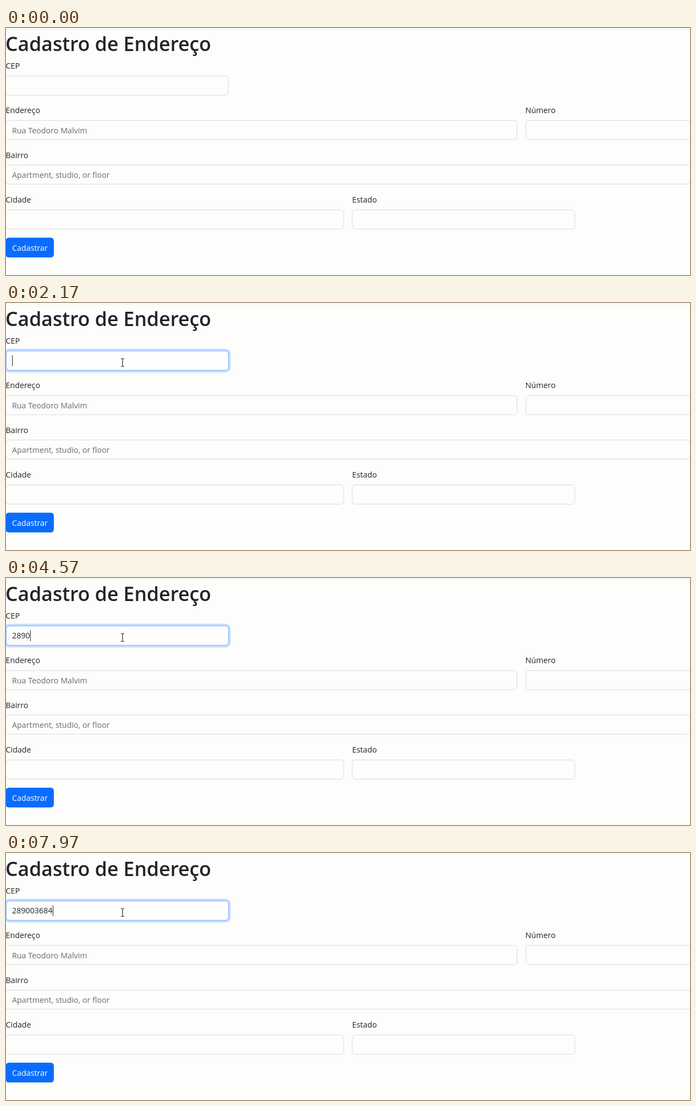
Recreate the animation shown at these times as an HTML page. Size 1244 by 450 pixels, loop 8 s.

```html
<!DOCTYPE html>
<html lang="pt-BR">
<head>
<meta charset="utf-8">
<title>Cadastro de Endereço</title>
<style>
  html, body { margin: 0; width: 100%; height: 100%; overflow: hidden; background: #fdfdfc; }
  body { position: relative; font: 14.3px "Open Sans", "Noto Sans", sans-serif; color: #212529; }
  svg { position: absolute; left: 0; top: 0; }
  text { fill: #212529; }
  .title { font-size: 35.55px; font-weight: 600; }
  .hint { fill: #686c70; }
  .on-button { fill: #fff; }
  .field rect { fill: none; stroke: #dadae6; rx: 5.5px; }

  .focus, .typed, .pointer, .arrow, .beam { animation: 8s step-end infinite; }

  .focus {
    position: absolute; left: 0; top: 87px; width: 405px; height: 36px;
    box-sizing: border-box; border: 1px solid #86b7fe; border-radius: 6px;
    background: #fefefe; box-shadow: 0 0 0 3.5px #c3dafe;
    animation-name: focus; animation-timing-function: ease-in-out;
  }
  /* The right border is the caret; the width uncovers whole digits. */
  .typed {
    position: absolute; left: 11px; top: 95px; height: 20px; line-height: 20px;
    overflow: hidden; white-space: nowrap; border-right: 1px solid #212529;
    animation-name: type, blink;
  }
  .pointer { animation-name: move; animation-timing-function: linear; }
  .arrow { animation-name: arrow; }
  .beam { animation-name: beam; }

  @keyframes focus {
    0%, 21% { opacity: 0; }
    22.875%, 100% { opacity: 1; }
  }
  @keyframes type {
    0% { width: 0; }
    40% { width: 1ch; }
    45.625% { width: 2ch; }
    51.875% { width: 3ch; }
    56.25% { width: 4ch; }
    60.625% { width: 5ch; }
    73.75% { width: 6ch; }
    81.25% { width: 7ch; }
    88.75% { width: 8ch; }
    95.625%, 100% { width: 9ch; }
  }
  @keyframes blink {
    0%, 27.625%, 67.25%, 80.375%, 87.875%, 95.375% { border-color: transparent; }
    21%, 34.25%, 73.75%, 81.25%, 88.75%, 95.625%, 100% { border-color: #212529; }
  }
  @keyframes move {
    0%, 8.5% { transform: translate(478px, -20px); animation-timing-function: ease-out; }
    11.5%, 11.75% { transform: translate(404px, 39px); animation-timing-function: ease-in-out; }
    17%, 100% { transform: translate(212px, 108px); }
  }
  @keyframes arrow {
    0% { opacity: 1; }
    15%, 100% { opacity: 0; }
  }
  @keyframes beam {
    0% { opacity: 0; }
    15%, 100% { opacity: 1; }
  }
</style>
</head>
<body>
<svg width="1244" height="450">
  <path d="M0 2.5H1244" stroke="#f5f5e6"/>
  <text class="title" x="-1" y="41.5">Cadastro de Endereço</text>

  <text x="-.5" y="74">CEP</text>
  <text x="-.5" y="155">Endereço</text>
  <text x="944.5" y="155">Número</text>
  <text x="-.5" y="236.5">Bairro</text>
  <text x="-.5" y="318">Cidade</text>
  <text x="629.5" y="318">Estado</text>

  <g class="field">
    <rect x="-.5" y="87.5" width="405" height="35"/>
    <rect x="-.5" y="168.5" width="930" height="35"/>
    <rect x="945.5" y="168.5" width="299" height="35"/>
    <rect x="-.5" y="249.5" width="1245" height="35"/>
    <rect x="-.5" y="331.5" width="614.5" height="35"/>
    <rect x="629.5" y="331.5" width="405" height="35"/>
  </g>
  <text class="hint" x="11" y="192">Rua Teodoro Malvim</text>
  <text class="hint" x="11" y="273">Apartment, studio, or floor</text>

  <rect x="-.5" y="382" width="87.5" height="36" rx="5.5" fill="#0a6cfd"/>
  <text class="on-button" x="11" y="405.5">Cadastrar</text>
</svg>

<div class="focus"></div>
<div class="typed">289003684</div>

<svg width="1244" height="450">
  <g class="pointer">
    <path class="arrow" d="M.5 .5V15.5L4 12.2L6.3 17.3L8.6 16.3L6.4 11.3H10.8Z" fill="#fff" stroke="#222"/>
    <path class="beam" d="M-3 -6.5H-1L0 -6L1 -6.5H3M0 -6V7M-3 7.5H-1L0 7L1 7.5H3" fill="none" stroke="#222" stroke-width="1.2"/>
  </g>
</svg>
</body>
</html>
```
